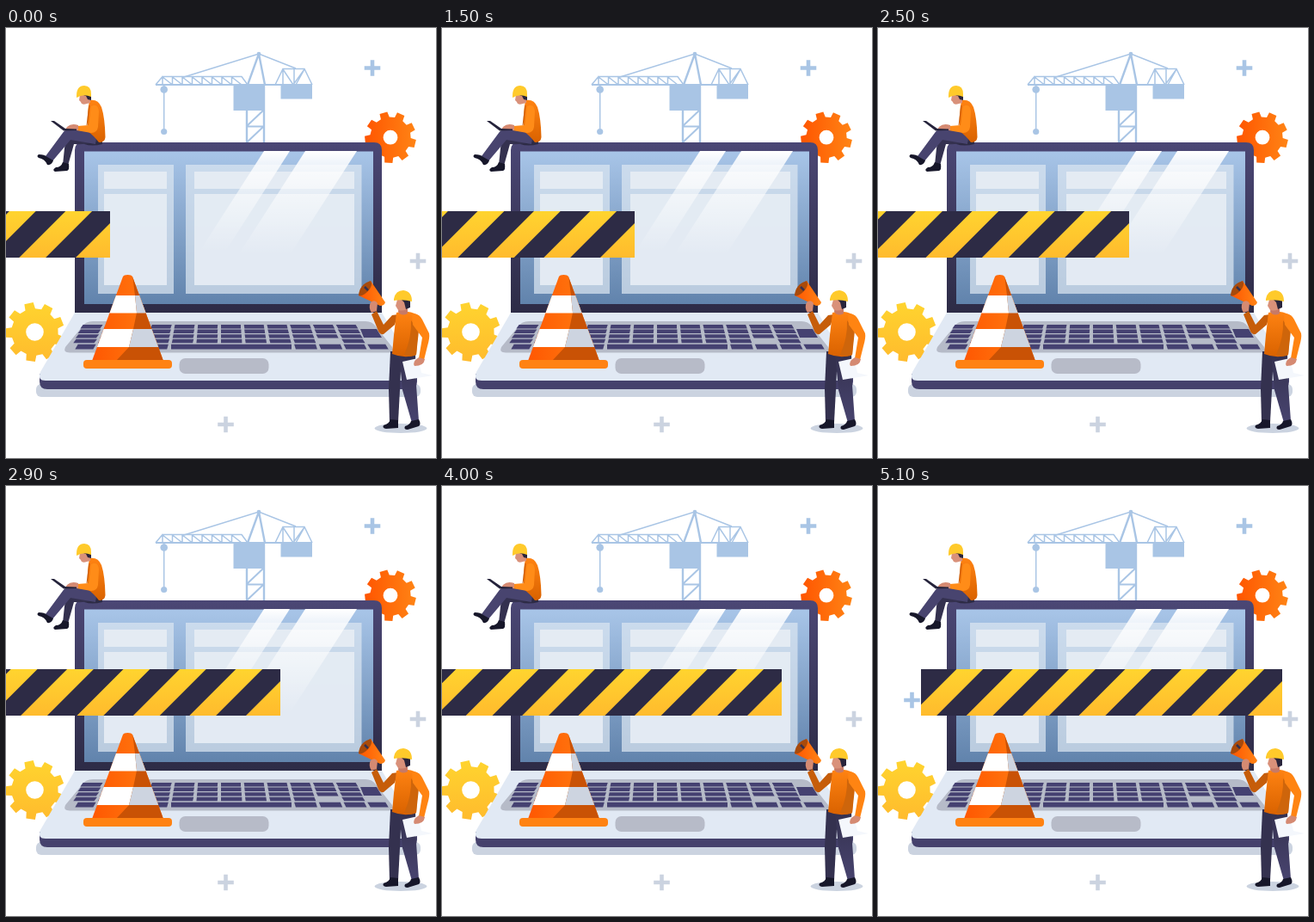
These frames come from a looping animation (500 px wide and 500 px high, 5.2 s). An HTML page:

```html
<!DOCTYPE html>
<html lang="en">
<head>
<meta charset="utf-8">
<title>Under construction</title>
<style>
html, body { margin: 0; width: 100%; height: 100%; overflow: hidden; background: #fff; }
svg { display: block; width: 100vw; height: 100vh; }
</style>
</head>
<body>
<svg viewBox="0 0 500 500">
  <defs>
    <linearGradient id="lid" x2="0" y2="1"><stop stop-color="#4b4775"/><stop offset="1" stop-color="#2d2b46"/></linearGradient>
    <linearGradient id="screen" x2="0" y2="1"><stop stop-color="#a8c5e8"/><stop offset="1" stop-color="#6183ac"/></linearGradient>
    <linearGradient id="glare" x2="0" y2="1"><stop stop-color="#fff"/><stop offset=".1" stop-color="#fff" stop-opacity=".85"/><stop offset="1" stop-color="#fff" stop-opacity="0"/></linearGradient>
    <linearGradient id="yellow" x2="0" y2="1"><stop stop-color="#ffd42f"/><stop offset="1" stop-color="#ffbb2d"/></linearGradient>
    <linearGradient id="orange" x2="1" y2="0"><stop stop-color="#ff5500"/><stop offset="1" stop-color="#ff8415"/></linearGradient>
    <linearGradient id="shirt" x2="0" y2="1"><stop stop-color="#ff8312"/><stop offset="1" stop-color="#d96200"/></linearGradient>
    <linearGradient id="pants" x2="0" y2="1"><stop stop-color="#34314f"/><stop offset="1" stop-color="#48446f"/></linearGradient>
    <clipPath id="cone"><path d="M136 289Q137 287 141.500 287Q146 287 147 289L183 387H100Z"/></clipPath>
    <clipPath id="tape"><path d="M0 213H420V267H0Z"/></clipPath>
  </defs>

  <g id="pluses" stroke-width="4.600"></g>

  <!-- crane -->
  <g fill="none" stroke="#a9c5e5" stroke-width="1.500">
    <path d="M174 66H356" stroke-width="2"/>
    <path d="M174 66L182 56.500H274L281 66" id="jib"/>
    <path d="M207 57L294 30L337 47"/>
    <path d="M294 30L281 66M294 30L301 66" stroke-width="2.400"/>
    <path d="M313 66L322 47.500H347L356 66M322 47V66M322 48L334 66L347 48M335 47V66M347 48L337 66"/>
    <path d="M183.700 66V120"/>
    <path d="M280 66V133M300 66V133" stroke-width="2.400"/>
    <path d="M280 114L300 95M280 114.500H300M280 133L300 114" stroke-width="2"/>
    <g fill="#a9c5e5" stroke="none">
      <path d="M264.500 66H301V96H264.500ZM319.500 66H356V82.500H319.500Z"/>
      <circle cx="294" cy="30" r="2.300"/>
      <circle cx="183.700" cy="71.500" r="4.300"/>
      <circle cx="183.700" cy="120.500" r="3.600"/>
    </g>
  </g>

  <path id="gearA" fill="url(#orange)" fill-rule="evenodd"/>
  <path id="gearB" fill="url(#yellow)" fill-rule="evenodd"/>

  <!-- laptop -->
  <path d="M80 331V142Q80 133 89 133H428Q437 133 437 142V331Z" fill="url(#lid)"/>
  <path d="M91 143.500H427V321H91Z" fill="url(#screen)"/>
  <path d="M107 159H195V309H107ZM209 159H413.500V309H209Z" fill="#dce7f2" opacity=".72"/>
  <path d="M114 167H187V187H114ZM114 193H187V299H114ZM219 167H405V187H219ZM219 193H405V299H219Z" fill="#e7edf5" opacity=".92"/>
  <path d="M300 143H330L255 260H225Z" fill="url(#glare)"/>
  <path d="M348 143H408L330 264H270Z" fill="url(#glare)"/>
  <rect x="35" y="414" width="447" height="15" rx="6" fill="#cbd3e0"/>
  <path d="M39 402H478V411Q478 420 469 420H48Q39 420 39 411Z" fill="#45416c"/>
  <path d="M80 331H437L476 397Q482 410 470 410H46Q36 410 40 400Z" fill="#e1e9f4"/>
  <path d="M101 341H418Q426 341 430 347L449 371Q452 377.500 445 377.500H74Q66 377.500 69 371L88 348Q92 341 101 341Z" fill="#b6bbc8"/>
  <g id="keys" fill="#454171"></g>
  <path d="M412 350H431L437 360H416Z" fill="#454171"/>
  <rect x="201.500" y="384" width="104" height="18" rx="7" fill="#b7bbc8"/>

  <!-- barrier -->
  <g id="bar"><g clip-path="url(#tape)">
    <path d="M0 213H420V267H0Z" fill="#2d2b45"/>
    <path id="stripes" fill="url(#yellow)"/>
  </g></g>

  <!-- traffic cone -->
  <g clip-path="url(#cone)">
    <path d="M95 287H190V387H95Z" fill="url(#orange)"/>
    <path d="M95 311H190V331.500H95ZM95 350H190V371H95Z" fill="#fff"/>
    <path id="shade" d="M147 287L150 311L152 331L148 350L143 371L128 387H190V287Z" fill="#c95205"/>
    <path d="M150 311H190V331.500H152ZM148 350H190V371H143Z" fill="#cdd4e0"/>
  </g>
  <rect x="90" y="386" width="103" height="10" rx="4" fill="#ff8212"/>

  <!-- seated worker -->
  <g stroke-linejoin="round">
    <path d="M93 129L112 127V135Q100 138 91 135Z" fill="#2d2b45"/>
    <path d="M102 121L78 124Q69 128 68 140L66 159L72 160L79 135Q100 136 109 130Z" fill="#34314f"/>
    <path d="M106 121L78 117Q70 116 66 122L46 149L53 156L75 130L104 135Z" fill="#48446f"/>
    <path d="M38 147Q45 147 48 150L55 154Q53 160 48 159Q45 152 38 151Q35 149 38 147ZM66 156L73 158Q74 165 71 166L57 167Q53 165 58 162Q64 162 66 156Z" fill="#17172a"/>
    <path d="M97 84Q107 82 111 92Q115 104 115.500 127Q115 133 108 133Q102 125 96 121Q93 105 97 84Z" fill="url(#shirt)"/>
    <path d="M99 91Q107 87 108 97L107 115Q106 122 99 122L82 119L83 114L96 113Z" fill="#ff8c18"/>
    <path d="M97 90L94 113" stroke="#c65a08" fill="none"/>
    <path d="M84 113Q76 110 71 115L69 118L84 119Z" fill="#d58a72"/>
    <path d="M52 108L56 108L69 117L82 117.500L82 119L67 119.500Z" fill="#25233b"/>
    <path d="M86 78H98L98 87L94 88Q88 90 87 86L85 84Z" fill="#d9917a"/>
    <path d="M90 78H99L99 84L95 83L93 79Z" fill="#28243b"/>
    <path d="M82 79Q82 67 91 67Q99 67 99 77V80Q90 76 82 81Z" fill="#ffca2b"/>
  </g>

  <!-- standing worker -->
  <ellipse cx="459" cy="465.500" rx="30.500" ry="5.500" fill="#cbd3e0"/>
  <path d="M447 376H460L458 421L456 458H446L445 420Z" fill="#34314f"/>
  <path d="M457 378H476L477 415L480 457L472 459L461 421Z" fill="url(#pants)"/>
  <path d="M447 455L456 456V465L442 466Q437 465 439 462Q446 460 447 455ZM471 457L480 455Q483 461 480 463L467 467Q462 467 464 463Q470 461 471 457Z" fill="#17172a"/>
  <path d="M456 333L452 345L439 356Q434 357 432 350L425 333L431 329L439 345L449 334Z" fill="#c65d0a"/>
  <path d="M454 331Q466 327 478 333Q483 340 479 352L477 380Q464 385 449 379L451 357Z" fill="url(#shirt)"/>
  <path d="M471 340Q472 360 463 380Q472 383 477 380L480 352Z" fill="#ce650b"/>
  <path d="M472 334Q479 330 484 339L492 355Q493 360 490 370L486 386L480 384L484 360L473 345Z" fill="#ff8412"/>
  <path d="M461 388L479 384L483 401L496 404L466 409Z" fill="#f4f7fc"/>
  <path d="M480 383L487 385Q486 393 475 393Q472 388 480 383Z" fill="#d58a72"/>
  <path d="M457 322H467V332Q460 336 456 330Z" fill="#c77a66"/>
  <path d="M455 316H468V325Q464 330 456 328L453 323Z" fill="#d9917a"/>
  <path d="M460 316H470V325L465 327L463 319Z" fill="#28243b"/>
  <path d="M451 315Q453 305 462 305Q472 306 472 318Q462 315 451 317Z" fill="#ffca2b"/>
  <path d="M424 294L441 319Q440 323 435 323L410 311Q413 299 424 294Z" fill="url(#orange)"/>
  <path d="M424 294Q427 299 421 306Q414 313 410 311Q411 298 424 294Z" fill="#a84a0b"/>
  <path d="M417 301L421 305" stroke="#34314f" stroke-width="2.500"/>
  <path d="M428 319L425 329" stroke="#34314f" stroke-width="3"/>
  <path d="M424 319Q429 315 432 320L431 329L425 331Q421 325 424 319Z" fill="#d58a72"/>
</svg>
<script>
const el = id => document.getElementById(id);

function gear(x, y, r, hole, start) {
  const teeth = 9, step = Math.PI * 2 / teeth;
  const pt = (rad, a) => (x + rad * Math.cos(a)).toFixed(2) + " " + (y + rad * Math.sin(a)).toFixed(2);
  const pts = [];
  for (let i = 0; i < teeth; i++) {
    const a = start * Math.PI / 180 + i * step;
    pts.push(pt(r * .79, a - step * .32), pt(r, a - step * .24),
             pt(r, a + step * .2), pt(r * .79, a + step * .3));
  }
  return `M${pts.join("L")}ZM${x - hole} ${y}a${hole} ${hole} 0 1 0 ${2 * hole} 0a${hole} ${hole} 0 1 0 ${-2 * hole} 0Z`;
}
el("gearA").setAttribute("d", gear(447, 127.2, 30, 8.4, -105));
el("gearB").setAttribute("d", gear(33.5, 353.5, 34.5, 10.3, -101));

const plus = (x, y, c) => `<path d="M${x - 9.3} ${y}h18.600M${x} ${y - 9.3}v18.600" stroke="${c}"/>`;
el("pluses").innerHTML = plus(426, 46.5, "#a9c5e5") + plus(39.5, 249, "#a9c5e5") +
  plus(479, 271, "#cbd3e0") + plus(255.5, 461, "#cbd3e0");

// lattice of the crane arm
let lattice = el("jib").getAttribute("d");
for (let x = 182; x < 274; x += 11.5) lattice += `M${x} 66V57L${x + 11.5} 66`;
el("jib").setAttribute("d", lattice);

// keyboard: each row spreads a little wider than the one above
let keys = "";
const key = (x1, x2, y, h) => {
  const lean = (258 - (x1 + x2) / 2) / 100;
  keys += `<path d="M${x1 + lean} ${y}H${x2 + lean}L${x2 - lean} ${y + h}H${x1 - lean}Z"/>`;
};
for (let row = 0; row < 4; row++) {
  const pitch = 27 + row * .45, y = 345 + row * 5.6;
  for (let i = -6; i < 6; i++) {
    const x = 250 + i * pitch;
    if (row === 3 && i === 4 || (row === 1 || row === 2) && i > 5) continue;
    if ((row === 1 || row === 2) && x > 405) continue;
    key(x, x + pitch - 4, y, 4.4);
  }
}
for (const [a, b] of [[82, 103], [108, 132], [137, 161], [166, 188], [192, 332], [336, 361], [365, 390], [394, 418], [422, 443]])
  key(a, b, 367.8, 5.8);
el("keys").innerHTML = keys;

// diagonal stripes; the last one fills the right corner
const stripe = (x, w) => `M${x} 213h${w}l-54 54h${-w}Z`;
let d = stripe(434, 60);
for (let i = 0; i < 6; i++) d += stripe(368.3 - 65.4 * i, 30.8);
el("stripes").setAttribute("d", d);

const LOOP = 5200, TICK = 100;
function draw(ms) {
  const n = Math.floor(ms % LOOP / TICK);
  el("bar").setAttribute("transform", `translate(${Math.round(-299 + n * 349 / 51)} 0)`);
}
const t0 = performance.now();
function loop() {
  draw(performance.now() - t0);
  requestAnimationFrame(loop);
}
loop();
</script>
</body>
</html>
```
